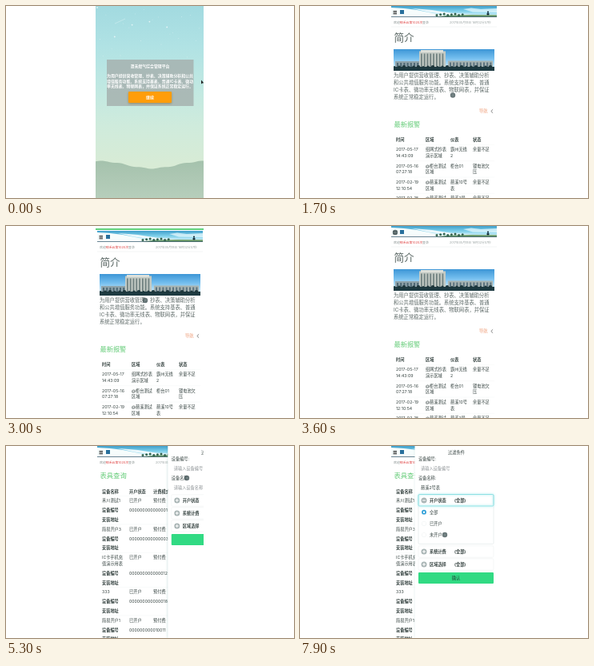
Recreate the animation shown at these times as an HTML page with a canvas. Size 360x240 px, loop 8000 ms.

```html
<!DOCTYPE html>
<html lang="zh">
<head>
<meta charset="utf-8">
<title>燃气综合管理平台</title>
<style>
html, body { margin: 0; width: 100%; height: 100%; overflow: hidden; background: #fff; }
canvas { display: block; width: 360px; height: 240px; }
</style>
</head>
<body>
<canvas id="c"></canvas>
<script>
const LOOP = 8000, STEP = 100;
const FONT = 'Inter, "Noto Sans CJK SC", "Noto Sans CJK", sans-serif';
const GREEN = '#62cb76', ORANGE = '#ff9d0a', INK = '#33403e', GRAY = '#808b8a', SALMON = '#ee9a74', RULE = '#f3f6f5';
const BRAND = '澄禾燃气', USER = 'guest';
const cv = document.getElementById('c'), g = cv.getContext('2d');
const dpr = window.devicePixelRatio || 1;
cv.width = 360 * dpr;
cv.height = 240 * dpr;

// Value at time t on a list of [time, value...] keys, eased between keys.
function track(keys, t, i = 1) {
  if (t <= keys[0][0]) return keys[0][i];
  for (let k = 1; k < keys.length; k++) {
    const a = keys[k - 1], b = keys[k];
    if (t <= b[0]) {
      const p = (t - a[0]) / (b[0] - a[0]);
      return a[i] + (b[i] - a[i]) * p * p * (3 - 2 * p);
    }
  }
  return keys[keys.length - 1][i];
}
// y is the middle of the line.
function text(s, x, y, size, color = INK, bold = false, align = 'left') {
  g.font = (bold ? '700 ' : '400 ') + size + 'px ' + FONT;
  g.fillStyle = color;
  g.textAlign = align;
  g.fillText(s, x, y + size * 0.37);
  return x + g.measureText(s).width;
}
function rect(x, y, w, h, color) {
  g.fillStyle = color;
  g.fillRect(x, y, w, h);
}
function round(x, y, w, h, r, fill, stroke) {
  g.beginPath();
  g.roundRect(x, y, w, h, r);
  if (fill) { g.fillStyle = fill; g.fill(); }
  if (stroke) { g.strokeStyle = stroke; g.lineWidth = 0.7; g.stroke(); }
}
function line(points, color, width = 0.6) {
  g.beginPath();
  points.forEach(p => g.lineTo(p[0], p[1]));
  g.strokeStyle = color;
  g.lineWidth = width;
  g.stroke();
}
function shape(points, color) {
  g.beginPath();
  points.forEach(p => g.lineTo(p[0], p[1]));
  g.closePath();
  g.fillStyle = color;
  g.fill();
}
function disc(x, y, r, color) {
  g.beginPath();
  g.arc(x, y, r, 0, 7);
  g.fillStyle = color;
  g.fill();
}
function ramp(y0, y1, ...colors) {
  const q = g.createLinearGradient(0, y0, 0, y1);
  colors.forEach((c, i) => q.addColorStop(i / (colors.length - 1), c));
  return q;
}
function glow(color, blur, dy, draw) {
  g.save();
  g.shadowColor = color;
  g.shadowBlur = blur * dpr;
  g.shadowOffsetY = dy * dpr;
  draw();
  g.restore();
}
function clip(x, y, w, h, draw) {
  g.save();
  g.beginPath();
  g.rect(x, y, w, h);
  g.clip();
  draw();
  g.restore();
}
function chevron(x, y, turn, color) {
  g.save();
  g.translate(x, y);
  g.rotate(turn * Math.PI / 2);
  line([[-1.1, -2.2], [1.2, 0], [-1.1, 2.2]], color, 0.9);
  g.restore();
}
const RIGHT = 0, DOWN = 1, LEFT = 2, UP = 3;

function sky() {
  rect(112, 0, 135, 240, ramp(0, 200, '#a2dae0', '#b0e2e4', '#c0e8e2', '#cfebdc', '#d8ebd5'));
  for (let i = 0; i < 26; i++) {
    const x = 114 + (i * 47.3) % 131, y = 2 + (i * i * 7.9) % 62;
    disc(x, y, i % 6 ? 0.4 : 0.9, 'rgba(255,255,255,.7)');
  }
  line([[136, 22], [149, 16]], 'rgba(255,255,255,.35)', 0.8);
  const pts = [[112, 240]];
  for (let x = 112; x <= 247; x += 3)
    pts.push([x, 198.5 - 4.5 * Math.cos((x - 118) / 20.5) + 0.6 * Math.sin(x / 4)]);
  pts.push([247, 240]);
  shape(pts, ramp(194, 240, '#a5c2ad', '#aec8b4', '#b6cebb'));
}
function orangeButton(x, y, w, h, s) {
  glow('rgba(120,90,20,.5)', 3, 1, () => round(x, y, w, h, 1, ORANGE));
  text(s, x + w / 2, y + h / 2, 4.9, '#fff', true, 'center');
}
function login(t) {
  sky();
  if (t < 500) {
    rect(126, 67, 108.5, 58, 'rgba(166,178,176,.85)');
    text(BRAND + '综合管理平台', 180, 75, 4.9, '#fff', true, 'center');
    ['为用户提供营收管理、抄表、决策辅助分析和公共',
     '增值服务功能。系统支持基表、普通IC卡表、微功',
     '率无线表、物联网表，并保证系统正常稳定运行。']
      .forEach((s, i) => text(s, 126, 87 + i * 6.8, 4.92, '#fff', true));
    orangeButton(153, 107, 54, 14, '继续');
    return;
  }
  text(BRAND + '综合管理平台', 180, 70, 4.95, '#667776', false, 'center');
  rect(124, 80, 112, 17, '#fffbd6');
  rect(124, 103, 112, 17, '#fffbd6');
  text(USER, 126, 88.5, 5.2, '#333');
  const dots = Math.max(0, Math.min(5, Math.floor((t - 1000) / 100)));
  for (let i = 0; i < dots; i++) disc(127 + i * 2.7, 111.5, 1, '#222');
  orangeButton(124, 123, 55.5, 14, 'jq版登录');
  orangeButton(180.5, 123, 55.5, 14, 'h5版登录(开发ing...)');
}

function header(second) {
  clip(114, 0, 132, 14, () => {
    rect(114, 0, 132, 14, ramp(0, 13, '#3f9fcb', '#7fd0ea', '#e2f7fb'));
    shape([[114, 2], [130, 3], [146, 5], [166, 9], [190, 13], [192, 14], [114, 14]], '#f6fcfc');
    shape([[140, 3], [165, 5], [190, 9], [216, 10.5], [186, 11], [160, 7.5]], 'rgba(255,255,255,.85)');
    shape([[204, 4], [214, 2.5], [226, 4], [246, 3], [246, 8], [216, 7.5]], 'rgba(240,253,255,.7)');
    shape([[168, 14], [184, 11.8], [212, 11], [246, 11.2], [246, 14]], '#6f9d6c');
    for (let i = 0; i < 8; i++) disc(171 + i * 4.6, 11.5 - i % 3 * 0.7, 1.5, '#35644f');
    line([[114, 13.6], [246, 13.6]], '#33566a', 0.8);
  });
  for (let i = 0; i < 3; i++) rect(116.5, 6 + i * 1.7, 4.5, 0.9, '#222');
  rect(125, 5, 5, 5, '#286f9c');
  disc(235, 7.5, 1.1, '#172f3c');
  disc(235, 10, 1.6, '#172f3c');
  let x = text('欢迎', 117, 20.5, 3.9, GRAY);
  x = text('晴禾云第1020次', x, 20.5, 3.9, '#e04848');
  text('登录', x, 20.5, 3.9, GRAY);
  text('2017年05月18日 16时02分' + second + '秒', 187, 20.5, 3.65, '#9aa3a2');
}
function photo() {
  clip(117, 54, 126, 27, () => {
    rect(117, 54, 126, 27, ramp(54, 76, '#3d96d6', '#72bdee', '#c9e9f8'));
    rect(119, 69, 31, 8, '#8fa3aa');
    rect(149, 56.5, 33, 22, '#c3cac4');
    rect(151, 55, 28, 3, '#dde0da');
    rect(185, 68.5, 56, 9, '#a8b4b2');
    for (let i = 0; i < 8; i++) rect(151 + i * 3.8, 59.5, 1.7, 17, '#6f807f');
    for (let i = 0; i < 13; i++) rect(187 + i * 4.2, 70.5, 2, 6, '#5d7480');
    for (let i = 0; i < 7; i++) rect(121 + i * 4.2, 71, 2, 5, '#4e6874');
    rect(117, 76, 126, 5, '#1e3b42');
    for (let i = 0; i < 22; i++) disc(118 + i * 6, 76.3, 1.2 + i % 3 * 0.5, '#1d373c');
  });
}

const ALARMS = [
  [['2017-05-17', '14:43:09'], ['组网式抄表', '演示区域'], ['霸州无线', '2'], ['余量不足']],
  [['2017-05-16', '07:27:18'], ['@柜台测试', '区域'], ['柜台01'], ['锂电池欠', '压']],
  [['2017-02-19', '12:10:54'], ['@慈溪测试', '区域'], ['慈溪10号', '表'], ['余量不足']],
  [['2017-02-18', '09:31:20'], ['@慈溪测试', '区域'], ['慈溪2号', '表'], ['余量不足']]
];
const COLS = [120, 157, 188, 216];

function home() {
  rect(112, -3, 135, 2, '#5fd07c');
  header(57);
  line([[114, 26], [246, 26]], '#e6eaea', 0.5);
  text('简介', 117.5, 39, 12.6, '#55625f');
  photo();
  ['为用户提供营收管理、抄表、决策辅助分析', '和公共增值服务功能。系统支持基表、普通',
   'IC卡表、微功率无线表、物联网表，并保证', '系统正常稳定运行。']
    .forEach((s, i) => text(s, 117, 86.5 + i * 9, 6.3, '#5c6866'));
  text('导航', 224, 131.5, 5.2, SALMON);
  chevron(240, 131.5, LEFT, '#777');
  text('最新报警', 117.5, 148, 8.2, GREEN);
  ['时间', '区域', '仪表', '状态'].forEach((s, i) => text(s, COLS[i], 167.5, 5.2, INK, true));
  ALARMS.forEach((row, r) => {
    const y = 179.4 + r * 20.3;
    line([[118, y - 6], [243, y - 6]], RULE, 0.5);
    row.forEach((cell, c) => cell.forEach((s, k) => text(s, COLS[c], y + k * 7.7, 5.2)));
  });
  stats(330);
}
function backToTop(y) {
  text('返回顶部', 213.5, y, 5.2, SALMON);
  chevron(240, y, UP, SALMON);
}
function stats(o) {
  backToTop(o - 62);
  text('用气统计', 117.5, o - 46, 8.2, GREEN);
  const rows = [['上月用气量'], ['上月累计缴', '费金额'], ['全年用气量', '', '6027.00', '立方'],
    ['全年消费金额', '', '0.00', '元'], ['全年充值金额', '', '103936.25', '元'], ['全年缴费金额', '', '0.00', '元']];
  rows.forEach(([a, b, v = '0.00', unit = '元'], i) => {
    const y = o - 27.5 + i * 20;
    line([[118, y - 6], [243, y - 6]], RULE, 0.5);
    text(a, 120, y, 5.25);
    if (b) text(b, 120, y + 8, 5.25);
    text(unit, text(v, 172.5, y, 5.2, '#2463c4'), y, 5.2, '#26a17f');
    text('环比', 213, y, 5.2);
    text('下降', 213, y + 7.8, 5.2);
  });
  backToTop(o + 91);
  text('逐月收费额分析', 117.5, o + 107, 8.3, GREEN);
  g.save();
  g.translate(0, o);
  chart();
  g.restore();
}
function chart() {
  const CYAN = '#7edcf2', BAR = '#ea803a', PINK = '#f08d83', LINE = '#5cc86c', AX = '#35a8bd';
  text('2017年逐月用气量', 179.5, 126, 5.7, '#333', true, 'center');
  line([[219, 128], [221, 125], [222.5, 126.5], [224.5, 123.5]], '#49bfb0', 0.8);
  [2, 5, 3.5].forEach((h, i) => rect(227 + i * 2, 128.5 - h, 1.2, h, '#49bfb0'));
  g.beginPath();
  g.arc(238, 126, 2.3, 0.5, 5.4);
  g.strokeStyle = '#555d7c';
  g.lineWidth = 0.8;
  g.stroke();
  round(131, 130, 6.5, 3.8, 1, BAR);
  text('上一年同期用气量', 138.7, 132, 3.95);
  round(174, 130, 6.5, 3.8, 1, CYAN);
  text('本期用气量', 182, 132, 3.95);
  line([[204.5, 132], [211, 132]], PINK);
  disc(207.8, 132, 1.2, PINK);
  text('同比增长', 213, 132, 3.95);
  line([[167.5, 140], [174.5, 140]], LINE);
  disc(171, 140, 1.2, LINE);
  text('环比增长', 176, 140, 3.95);
  text('用气量', 143, 137, 3.9, '#438bd1', false, 'center');
  text('同/环比增长', 217, 137, 3.9, '#438bd1', false, 'center');
  for (let i = 0; i < 6; i++) {
    const y = 143 + i * 17.8;
    line([[143, y], [217, y]], '#e3e6e6', 0.5);
    text((10 - i * 2) * 1000 + ' m³', 141.5, y, 3.9, INK, false, 'right');
  }
  for (let i = 0; i < 5; i++) text(100 - i * 50 + ' %', 219.5, 143 + i * 22, 3.9);
  for (let i = 0; i < 6; i++) text(1 + i * 2 + '月', 147 + i * 12.2, 238.5, 4.3, INK, false, 'center');
  const bar = (x, top, w, c) => rect(x, top, w, 232.5 - top, c);
  bar(146, 198, 3, CYAN);
  bar(152.8, 209, 2.6, CYAN);
  bar(180.2, 157, 2.8, BAR);
  bar(204.8, 215, 2.8, BAR);
  bar(210.8, 213, 2.8, BAR);
  line([[143, 187], [217, 187]], AX, 0.7);
  line([[143, 143], [143, 232.5]], AX, 0.8);
  line([[217, 143], [217, 232.5]], AX, 0.9);
  line([[143, 232.5], [217, 232.5]], AX, 0.7);
  g.setLineDash([1.6, 1.2]);
  line([[143, 222.5], [218, 222.5]], BAR);
  line([[143, 227.5], [218, 227.5]], CYAN);
  g.setLineDash([]);
  text('1,135.56', 219.5, 222.5, 3.6, BAR);
  line([[146, 152], [158.5, 231.5], [214, 231.5]], LINE, 0.8);
  disc(146, 152, 1.2, LINE);
  text('8.97', 147, 147, 3.5, LINE, false, 'center');
  text('8,228.1', 181.5, 152, 3.7, BAR, false, 'center');
  text('1,999.7', 205, 210, 3.5, BAR, false, 'center');
  text('2,217.3', 211, 206.5, 3.5, BAR, false, 'center');
  text('3,751.5', 148, 194.5, 3.5, CYAN, false, 'center');
  for (let i = 0; i < 9; i++) {
    text('-100', 162 + i * 6.1, 227 + i % 2, 3.1, PINK, false, 'center');
    disc(162 + i * 6.1, 231.3, 0.8, PINK);
  }
}

function menu(x, open) {
  const items = [BRAND + '平台主页', '营收管理', '系统监测', '数据查询', '数据报表', '报警查询', '后台管理', '日常业务', '退出'];
  g.save();
  g.translate(x, 0);
  glow('rgba(60,120,90,.3)', 2, 0, () => rect(112, 0, 105, 240, '#fff'));
  items.forEach((s, i) => {
    const y = 5.6 + i * 14.2 + (i > 3 ? open * 28.4 : 0), last = i === 8;
    text(s, 117.5, y, 5.2, last ? '#ed8c58' : GRAY);
    if (i) chevron(210, y, last ? RIGHT : DOWN, last ? '#ed8c58' : GRAY);
    else shape([[207.2, 5.8], [210, 3], [212.8, 5.8], [212, 5.8], [212, 8.2], [208, 8.2], [208, 5.8]], GRAY);
  });
  if (open === 1) {
    text('表具查询', 123, 62.6, 5.2, GRAY);
    text('抄表查询', 123, 76.8, 5.2, GRAY);
  }
  g.restore();
}

function meters() {
  header(58);
  text('表具查询', 117.5, 37, 8.3, GREEN);
  ['设备名称', '开户状态', '计费模式'].forEach((s, i) => text(s, [120, 154, 184][i], 56.8, 5.2, INK, true));
  let y = 68.5;
  const list = [['禾川测试1', '', '01'], ['简易开户3', '', '03'], ['IC卡手机充', '值演示用表', '12'],
    ['333', '', '18'], ['简易开户1', '', '10011']];
  list.forEach(([name, more, id]) => {
    line([[118, y - 6], [243, y - 6]], RULE, 0.5);
    text(name, 120, y, 5.2);
    text('已开户', 154, y, 5.2);
    text('预付费', 184, y, 5.2);
    if (more) text(more, 120, y += 7.8, 5.2);
    text('设备编号', 120, y += 11.8, 5.2, INK, true);
    text(id.padStart(15, '0'), 154, y, 5.2);
    text('安装地址', 120, y += 11.7, 5.2, INK, true);
    y += 11.9;
  });
  text('安装地址', 120, y, 5.2, INK, true);
}
function filter(x, t) {
  const open = track([[6500, 0], [6800, 1]], t), dy = open * 48;
  g.save();
  g.translate(x, 0);
  glow('rgba(40,130,120,.35)', 3, 0, () => rect(143.5, 0, 104, 240, '#fff'));
  text('过滤条件', 195.5, 7.7, 5.2, INK, false, 'center');
  text('设备编号:', 148, 16, 5.2);
  text('请输入设备编号', 151, 28.3, 5.2, '#8d9396');
  text('设备名称:', 148, 40, 5.2);
  const typed = '慈溪2号表'.slice(0, Math.max(0, Math.floor((t - 5500) / 100)));
  text(typed || '请输入设备名称', 151, 52, 5.2, typed ? INK : '#8d9396');
  if (open > 0) {
    clip(146, 74, 99, dy, () => {
      ['全部', '已开户', '未开户'].forEach((s, i) => {
        const y = 82.7 + i * 14.2;
        disc(155, y, 2.9, i ? '#f0f3f3' : '#2f9fd8');
        disc(155, y, i ? 2.4 : 1.2, '#fff');
        text(s, 162, y, 5.2);
      });
    });
    round(148, 60.5, 94, 14 + dy, 1.5, null, '#e3eaea');
    glow('#59d9dc', 3, 0, () => round(148, 60.5, 94, 14.5, 1.5, null, '#75dce0'));
  }
  ['开户状态', '系统计费', '区域选择'].forEach((s, i) => {
    const y = 68 + i * 16 + (i ? dy : 0);
    if (i || !open) round(148, y - 7.2, 94, 14.4, 1.5, null, '#f1f4f4');
    disc(155, y, 3.5, '#a9b5b5');
    rect(153, y - 0.5, 4, 1, '#fff');
    if (i || !open) rect(154.5, y - 2, 1, 4, '#fff');
    text(s, 162, y, 5.2, INK, true);
    text('(全部)', 193, y, 5.2, INK, true);
  });
  round(148, 110 + dy, 94, 14, 1, '#31da83');
  text('确认', 195, 117 + dy, 5.2, '#23483a', false, 'center');
  g.restore();
}

const POINTER = [[0, 244, 94], [400, 182, 114], [600, 182, 114], [900, 162, 86], [1100, 162, 86],
  [1400, 208, 130], [1600, 208, 130], [1800, 174, 93], [3100, 174, 93], [3500, 119, 8], [3800, 119, 8],
  [4300, 134, 105], [4500, 134, 49], [4700, 134, 63], [4900, 134, 63], [5200, 226, 40], [5400, 226, 40],
  [5600, 176, 52], [6200, 176, 52], [6500, 156, 68], [6800, 156, 68], [7100, 157, 83], [7500, 176, 97],
  [7900, 181, 111]];
const SCROLL = [[1800, 0], [2200, 330], [2500, 330], [2900, -6], [3000, -6], [3200, 0]];

function pointer(t) {
  const x = track(POINTER, t), y = track(POINTER, t, 2);
  if (t < 100) {
    shape([[x, y - 1.5], [x, y + 3.5], [x + 1.3, y + 2.4], [x + 3.3, y + 2.3]], '#222');
  } else {
    disc(x, y, 3.2, 'rgba(62,80,82,.78)');
    disc(x, y, 1.8, 'rgba(130,145,145,.5)');
  }
}
function draw(t) {
  g.setTransform(dpr, 0, 0, dpr, 0, 0);
  rect(0, 0, 360, 240, '#fff');
  clip(112, 0, 135, 240, () => {
    if (t < 1600) login(t);
    else if (t < 4900) {
      g.save();
      g.translate(0, -track(SCROLL, t));
      home();
      g.restore();
      if (t >= 3700) menu(track([[3700, -105], [4000, 0]], t), track([[4500, 0], [4600, 1]], t));
    } else {
      meters();
      const p = Math.max(0, Math.min(1, (t - 5200) / 230));
      if (p > 0) filter(104 * (1 - p), t);
    }
    pointer(t);
  });
}
function tick() {
  draw(Math.floor(performance.now() % LOOP / STEP) * STEP);
  requestAnimationFrame(tick);
}
tick();
</script>
</body>
</html>
```
